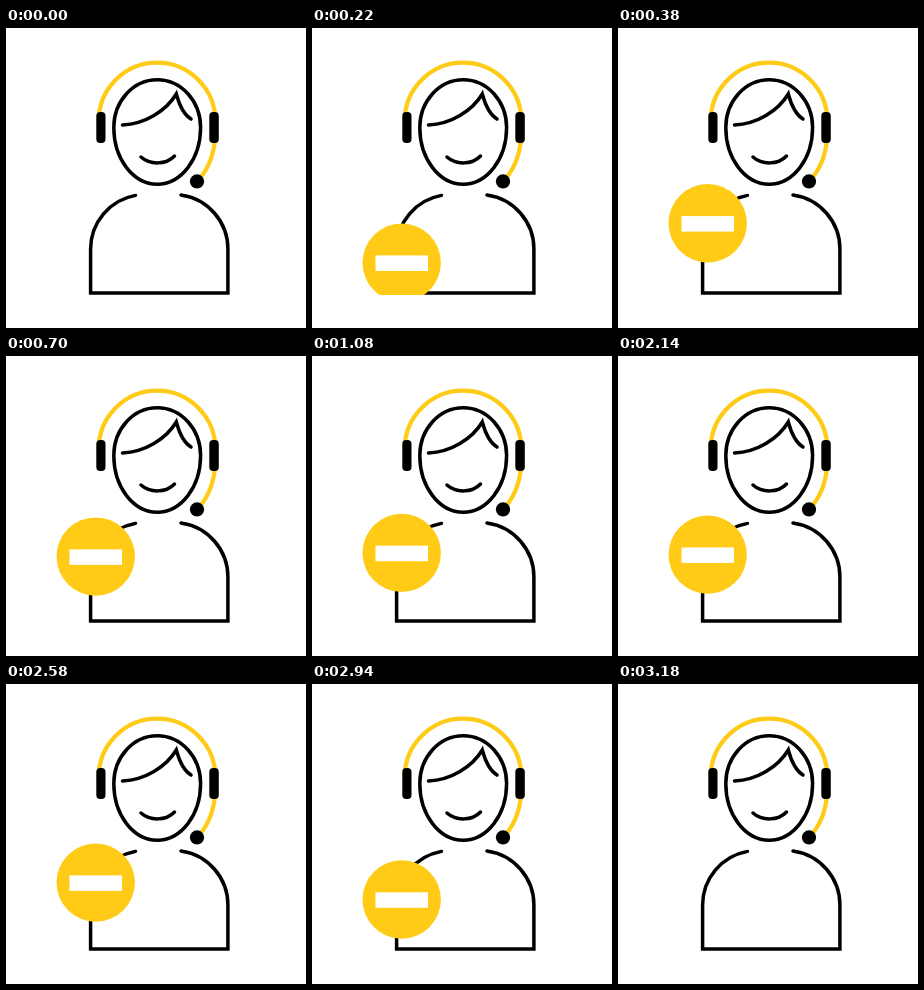
An HTML page that plays this animation: 300x300 px, repeating every 4800 ms.

```html
<!DOCTYPE html>
<html lang="en">
<head>
<meta charset="utf-8">
<title>Support agent</title>
<style>
  html, body { margin: 0; width: 100%; height: 100%; overflow: hidden; background: #fff; }
  svg { display: block; width: 100%; height: 100%; }
  .line { fill: none; stroke: #000; stroke-width: 3.5; stroke-linecap: round; }
  .headset { fill: none; stroke: #ffcb17; stroke-width: 4.2; }
</style>
</head>
<body>
<svg viewBox="0 0 300 300">
  <clipPath id="aboveBase"><rect width="300" height="267"/></clipPath>

  <g class="headset">
    <path d="M92.7 88V92.9A58.3 58.3 0 0 1 209.3 92.9V105C209 123 203 140 192.5 152"/>
  </g>
  <g class="line">
    <path d="M151.2 51.7C175.2 51.7 194.6 73.1 194.6 99.5C194.6 130.8 175.2 156.2 151.2 156.2C127.2 156.2 107.8 130.8 107.8 99.5C107.8 73.1 127.2 51.7 151.2 51.7Z"/>
    <path d="M116.5 97C139 96 160 83 170.3 66C173.5 78 178.5 87 185 91"/>
    <path d="M135 129C144 137 160 137 168.5 128"/>
    <path d="M129.5 167.4A54.5 54.5 0 0 0 84.6 221V265.1H221.9V221A54.5 54.5 0 0 0 175 167"/>
  </g>
  <rect x="90.3" y="84" width="9.2" height="31" rx="4"/>
  <rect x="203.3" y="84" width="9.5" height="31" rx="4"/>
  <circle cx="191" cy="153.4" r="7.1"/>

  <g clip-path="url(#aboveBase)">
    <g id="badge">
      <circle cx="89.7" r="39.2" fill="#ffcb17"/>
      <rect x="63.5" y="-7.2" width="52.5" height="15.5" fill="#fff"/>
    </g>
  </g>
</svg>
<script>
  const LOOP = 4800;
  const HIDDEN_Y = 306.5, REST_Y = 198.5;
  const RISE_START = 40, DROP_START = 2898, TRAVEL_TIME = 272;
  const RISE_END = RISE_START + TRAVEL_TIME;
  const badge = document.getElementById('badge');

  // Damped spring that overshoots upwards after the rise.
  function spring(seconds) {
    return -5.6 * Math.sin(2 * Math.PI * 1.6 * seconds) * Math.exp(-1.6 * seconds);
  }

  function badgeY(t) {
    const travel = HIDDEN_Y - REST_Y;
    if (t < RISE_END) {
      return REST_Y + travel * (RISE_END - t) / TRAVEL_TIME;
    }
    const drop = Math.max(0, (t - DROP_START) / TRAVEL_TIME);
    return REST_Y + spring((t - RISE_END) / 1000) + travel * drop;
  }

  function draw() {
    const t = performance.now() % LOOP;
    const visible = t >= 60 && t < 3180;
    badge.setAttribute('visibility', visible ? 'visible' : 'hidden');
    badge.setAttribute('transform', `translate(0 ${badgeY(t).toFixed(3)})`);
    requestAnimationFrame(draw);
  }
  draw();
</script>
</body>
</html>
```
